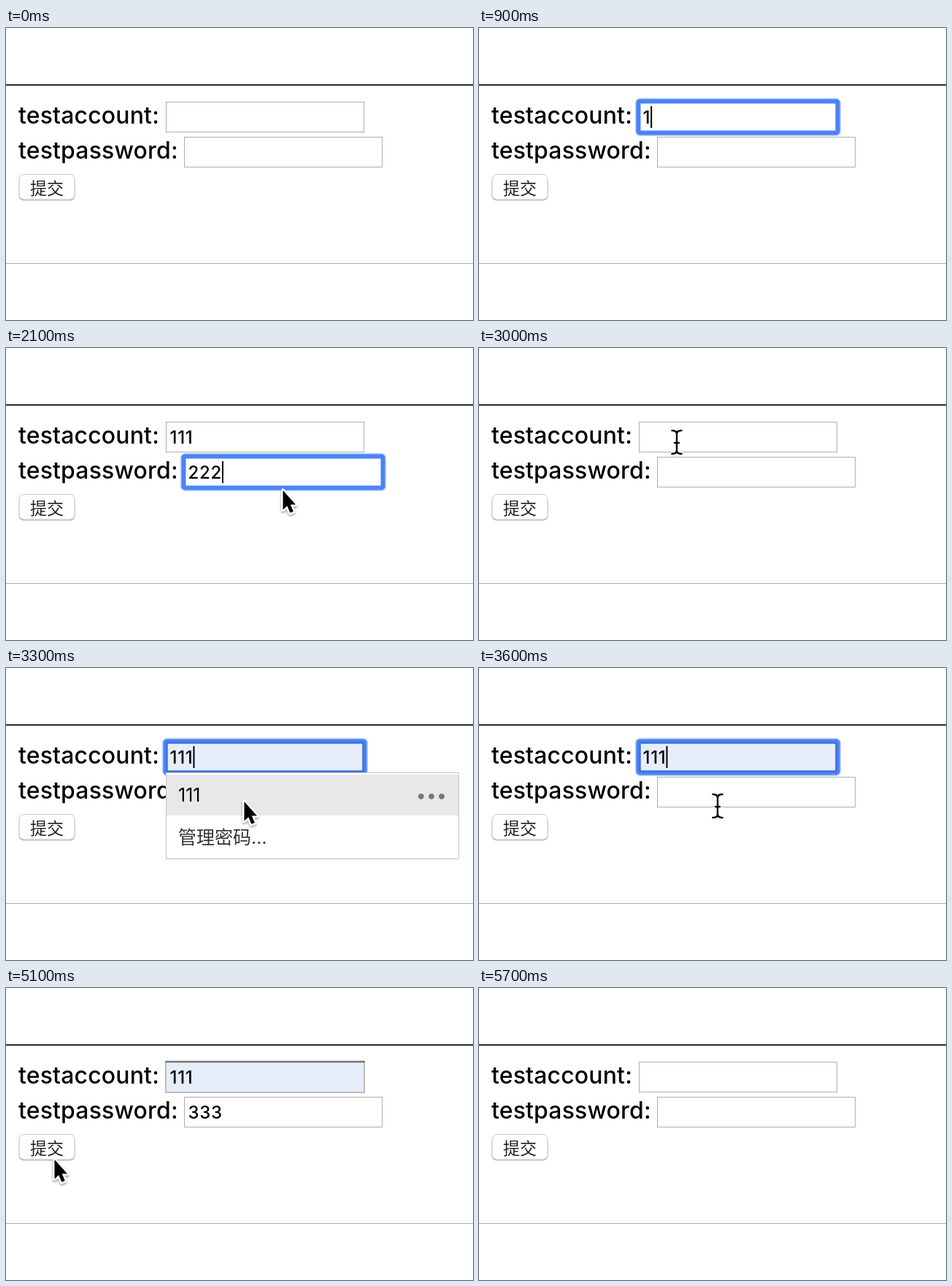
Write an HTML page that moves like this. It is 640 px wide and 400 px high and loops after 6000 ms.

```html
<!DOCTYPE html>
<html lang="zh">
<head>
<meta charset="utf-8">
<title>Form</title>
<style>
  html, body { margin: 0; width: 100%; height: 100%; overflow: hidden; background: #fff; }
  svg { display: block; }
  .label { font: 450 32px Inter, sans-serif; letter-spacing: .15px; }
  .value { font: 500 24px Inter, sans-serif; letter-spacing: .7px; }
  .button { font: 500 23px "Noto Sans CJK SC", "Noto Sans CJK", sans-serif; fill: #222; }
  .menu text { font: 25px Inter, "Noto Sans CJK SC", sans-serif; }
</style>
</head>
<body>
<svg width="640" height="400" viewBox="0 0 640 400">
  <defs>
    <filter id="shadow" x="-50%" y="-50%" width="200%" height="200%">
      <feDropShadow dx="0" dy="2" stdDeviation="1.6" flood-opacity=".4"/>
    </filter>
    <path id="pointer" d="M-.5 -1V25.5L5.3 20.2L9.4 29.8L13.8 28L9.8 18.5H17Z"/>
    <path id="caret" d="M-6.5 -16Q0 -16 0 -11Q0 -16 6.5 -16M0 -11V11M-6.5 16Q0 16 0 11Q0 16 6.5 16M-3 1H3"/>
  </defs>
  <rect width="640" height="400" fill="#fff"/>
  <rect y="77" width="640" height="2" fill="#262626"/>
  <rect y="322" width="640" height="1" fill="#adadad"/>
  <text class="label" x="17" y="131">testaccount:</text>
  <text class="label" x="17" y="179">testpassword:</text>
  <rect x="17.5" y="201" width="77" height="35.5" rx="7" fill="#b4b4b4"/>
  <rect x="18" y="200.5" width="76" height="34.5" rx="6.5" fill="#fff" stroke="#c9c9c9"/>
  <text class="button" x="33" y="228">提交</text>
  <g id="fields"></g>
  <g id="menu" class="menu">
    <rect x="219.5" y="143.5" width="401" height="118" fill="#fff" stroke="#c4c4c4"/>
    <rect x="220" y="146" width="400" height="56" fill="#e8e8e8"/>
    <text x="236" y="183">111</text>
    <text x="604" y="183" text-anchor="end" fill="#777">•••</text>
    <text x="236" y="241" fill="#333">管理密码…</text>
  </g>
  <g id="arrow">
    <use href="#pointer" stroke="#fff" stroke-width="5" stroke-linejoin="round" filter="url(#shadow)"/>
    <use href="#pointer"/>
  </g>
  <g id="beam" fill="none" stroke-linecap="round">
    <use href="#caret" stroke="#fff" stroke-width="5"/>
    <use href="#caret" stroke="#000" stroke-width="2.4"/>
  </g>
</svg>
<script>
const LOOP = 6000, STEP = 300;
const $ = id => document.getElementById(id);

function add(parent, tag, attrs) {
  const el = document.createElementNS('http://www.w3.org/2000/svg', tag);
  for (const key in attrs) el.setAttribute(key, attrs[key]);
  return parent.appendChild(el);
}

const show = (el, on) => { el.style.display = on ? '' : 'none'; };

function box(parent, x, y, w, h, pad, attrs) {
  return add(parent, 'rect', {
    x: x - pad, y: y - pad, width: w + 2 * pad, height: h + 2 * pad, fill: 'none', ...attrs
  });
}

function makeField(x, y) {
  const w = 272, h = 42;
  const g = add($('fields'), 'g', {});
  const frame = box(g, x, y, w, h, -.5, { fill: '#fff', stroke: '#adadad' });

  const filled = add(g, 'g', {});
  box(filled, x, y, w, h, 0, { fill: '#e6edfb', stroke: '#bdbdbd', 'stroke-width': 2 });
  const edge = add(filled, 'path', { d: `M${x - 1} ${y}h${w + 2}`, stroke: '#767676', 'stroke-width': 2.4 });

  const ring = add(g, 'g', {});
  box(ring, x, y, w, h, 2.5, { stroke: '#b4cdfb', 'stroke-width': 5, rx: 4 });
  box(ring, x, y, w, h, .5, { stroke: '#4a83f4', 'stroke-width': 6, rx: 2 });
  const inner = box(ring, x, y, w, h, -1.5, { stroke: '#3c6bd6', 'stroke-width': 2 });

  const text = add(g, 'text', { x: x + 5.5, y: y + 30, class: 'value' });
  const caret = add(g, 'rect', { y: y + 6, width: 2, height: 30 });

  return ({ value = '', focus = false, auto = false }) => {
    text.textContent = value;
    show(frame, !auto);
    show(filled, auto);
    show(edge, !focus);
    show(ring, focus);
    show(inner, auto);
    show(caret, focus);
    caret.setAttribute('x', x + 5.5 + (value ? text.getComputedTextLength() : 0));
  };
}

const account = makeField(219, 101);
const password = makeField(244, 149);

const typed = { value: '111' };
const auto = { value: '111', auto: true };
const focus = (value, more) => ({ value, focus: true, ...more });

// Each state holds from its time until the next one.
const states = [
  { at: 0 },
  { at: 600, beam: [279.5, 111.5] },
  { at: 900, account: focus('1') },
  { at: 1200, account: focus('111'), beam: [327, 189] },
  { at: 1500, account: typed, arrow: [380, 194] },
  { at: 1800, account: typed, password: focus('2') },
  { at: 2100, account: typed, password: focus('222'), arrow: [380, 196] },
  { at: 2400, account: typed, password: { value: '222' }, arrow: [66, 235] },
  { at: 2700, arrow: [64, 219] },
  { at: 3000, beam: [271, 129] },
  { at: 3300, account: focus('111', { auto: true }), menu: true, arrow: [327, 184] },
  { at: 3600, account: focus('111', { auto: true }), beam: [327, 189] },
  { at: 3900, account: auto, password: focus('') },
  { at: 4200, account: auto, password: focus(''), arrow: [380, 226] },
  { at: 4500, account: auto, password: focus('3') },
  { at: 4800, account: auto, password: { value: '333' }, arrow: [372, 266] },
  { at: 5100, account: auto, password: { value: '333' }, arrow: [67, 236] },
  { at: 5400, arrow: [541, 236] },
  { at: 5700 }
];

function place(el, pos) {
  show(el, !!pos);
  if (pos) el.setAttribute('transform', `translate(${pos})`);
}

function render(ms) {
  const t = Math.floor(ms % LOOP / STEP) * STEP;
  const state = states.filter(s => s.at <= t).pop();
  account(state.account || {});
  password(state.password || {});
  show($('menu'), state.menu);
  place($('arrow'), state.arrow);
  place($('beam'), state.beam);
}

const start = performance.now();
function tick() {
  render(performance.now() - start);
  requestAnimationFrame(tick);
}
tick();
</script>
</body>
</html>
```
